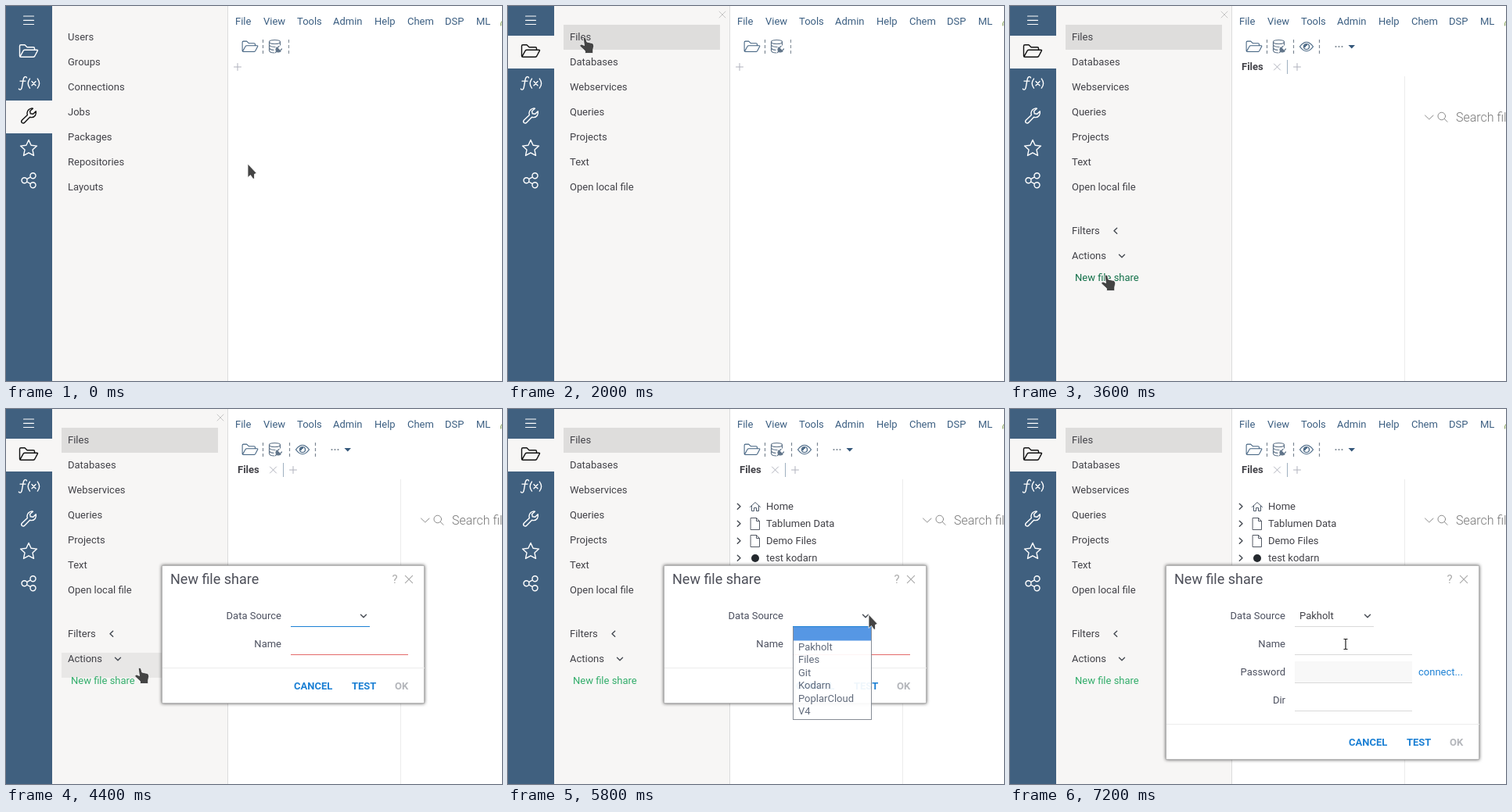
Write an HTML page that moves like this. It is 634 px wide and 480 px high and loops after 8200 ms.

```html
<!DOCTYPE html>
<html lang="en">
<head>
<meta charset="utf-8">
<title>New file share</title>
<style>
  html, body { margin: 0; width: 100%; height: 100%; overflow: hidden; background: #fff; }
  svg { display: block; width: 634px; height: 480px; }
  text { font: 13px Roboto, "Open Sans", sans-serif; fill: #424248; white-space: pre; }
  .line, .line * { fill: none; stroke-linecap: round; stroke-linejoin: round; }
  .side { stroke: #fff; stroke-width: 1.4; }
  .side.on { stroke: #111; }
  .menu text { fill: #3c5f82; }
  .tool { stroke: #40607f; stroke-width: 1.2; }
  .dash { stroke: #7d8994; stroke-dasharray: 4 3; stroke-linecap: butt; }
  .faint { stroke: #b0b2bd; }
  .dark { stroke: #454a52; stroke-width: 1.4; }
  .rule { stroke: #d9d9d9; }
  .label text { text-anchor: end; fill: #4d5160; }
  .button text { font-weight: 700; fill: #1c80d4; }
  .options text { fill: #566072; }
  #link { fill: #33ad6b; }
  #link.over { fill: #14714a; }
  #frame { fill: #fff; stroke: #b5b5b5; filter: drop-shadow(0 0 2px #000a); }
</style>
</head>
<body>
<svg viewBox="0 0 634 480">
  <defs>
    <path id="folder" d="M-11.5 6V-6.5Q-11.5-8-10-8H-5L-2-5H6Q7.5-5 7.5-3.5V-1.5M-11 7L-6.8-.5Q-6.2-1.5-5-1.5H10.5Q12-1.5 11.3-.3L7.8 6.3Q7 7.5 5.8 7.5H-10Q-11.5 7.5-11.5 6"/>
    <path id="func" d="M-2.5-7.2Q-3.3-9.2-5.3-8.2Q-6.6-7.3-7-4.5L-8.6 4.5Q-9.2 8-11 8Q-12 8-12.6 7M-11-3H-4M1.5-6Q-3.2 0 1.5 6M4-2.6L9 2.6M9-2.6L4 2.6M11.3-6Q16 0 11.3 6"/>
    <path id="wrench" d="M3-9.3Q-1.5-8-2-3.5Q-2-2-1.6-1L-8.5 5.5Q-10.2 7.5-8.5 9Q-6.7 10.3-5 8.5L1.5 1.8Q6 3 8.5-.5Q9.9-3 9.2-5.8L5.7-2.2L2.2-2.8L1.6-6L5.4-9.3Q4.2-9.7 3-9.3Z"/>
    <path id="star"/>
    <path id="share" d="M-9 0a3.5 3.5 0 1 0 7 0a3.5 3.5 0 1 0-7 0M2-6a3.5 3.5 0 1 0 7 0a3.5 3.5 0 1 0-7 0M2 6a3.5 3.5 0 1 0 7 0a3.5 3.5 0 1 0-7 0M-2.4-1.7L2.4-4.4M-2.4 1.7L2.4 4.4"/>
    <path id="down" d="M-3.5-1.7L0 1.7L3.5-1.7"/>
    <path id="right" d="M-1.7-3.7L2-.2L-1.7 3.3"/>
    <path id="cross" d="M-4-4L4 4M4-4L-4 4"/>
    <path id="plus" d="M-4.5 0H4.5M0-4.5V4.5"/>
    <path id="page" d="M-5.5-7.5H1.5L5.5-3.5V7.5H-5.5ZM1.5-7.5V-3.5H5.5"/>
  </defs>

  <rect width="59" height="480" fill="#40607f"/>
  <rect x="59" width="224" height="480" fill="#f7f6f5"/>
  <path d="M283.5 0V480" stroke="#dcdcdc"/>
  <rect id="cell" width="59" height="42" fill="#f7f6f5"/>
  <path class="line side" d="M22.5 13H35.5M22.5 18.3H35.5M22.5 23.5H35.5" style="stroke-width:1.2"/>
  <g id="side"></g>

  <rect id="chosen" x="71" y="24" width="200" height="32" fill="#dedddc"/>
  <rect id="hover" x="71" width="200" height="32" fill="#e8e7e6"/>
  <g id="admin"></g>
  <g id="data"></g>
  <g id="extra">
    <text x="79" y="292">Filters</text>
    <text x="79" y="324">Actions</text>
    <text id="link" x="83" y="352">New file share</text>
    <g class="line dark">
      <use href="#right" transform="translate(135 288) scale(-1 1)"/>
      <use href="#down" x="143" y="320"/>
    </g>
  </g>
  <use id="close" class="line" href="#cross" x="274" y="11" stroke="#c6c6c6"/>

  <g id="menu" class="menu"></g>
  <path class="line" d="M632.5 25Q631.5 21 635 18.5" stroke="#7d9a4a"/>
  <g class="line tool">
    <use href="#folder" transform="translate(312 52) scale(.86)"/>
    <path class="dash" d="M328.5 43V62"/>
    <g style="stroke:#61758a">
      <ellipse cx="343.5" cy="46" rx="7" ry="2.5"/>
      <path d="M336.5 46V57Q337 60 343 60M350.5 46V50M336.5 50Q338 52.5 344 52.5M336.5 54Q338 56.3 342 56.3"/>
      <path d="M344.5 59.5L347 57M349 51.5L347.5 53M352.5 55L351 56.5"/>
      <path d="M346 53L351 58Q348 60 346 58Q344 56 346 53Z" style="fill:#61758a"/>
    </g>
  </g>
  <g id="emptyTab" class="line">
    <path class="dash" d="M361.5 43V62"/>
    <use class="faint" href="#plus" x="296" y="78"/>
  </g>

  <g id="view">
    <g class="line tool">
      <path class="dash" d="M362.5 43V62M395.5 43V62"/>
      <path d="M370.5 52Q379 40.500 387.500 52Q379 63.500 370.500 52Z"/>
      <circle cx="379" cy="52" r="3.500"/>
      <path d="M377 52Q377 50 379 50" style="stroke-width:2"/>
    </g>
    <g fill="#7d8994">
      <circle cx="416.500" cy="52" r="1.100"/><circle cx="420.500" cy="52" r="1.100"/><circle cx="424.500" cy="52" r="1.100"/>
    </g>
    <path d="M432.500 50H441L436.800 54.500Z" fill="#34577a"/>
    <text x="296" y="82" style="font-weight:700">Files</text>
    <g class="line faint">
      <use href="#cross" x="341.500" y="78"/>
      <use href="#plus" x="367" y="78"/>
    </g>
    <path d="M354.500 69V87" stroke="#9fb0c0"/>
    <path d="M504.500 90V480" stroke="#ececec"/>
    <g class="line" stroke="#8c8c8c">
      <path d="M530.500 140L535.800 145L541 140"/>
      <circle cx="551.800" cy="141" r="4.800"/>
      <path d="M555.300 144.500L559 148.300"/>
    </g>
    <text x="570" y="148" style="font-size:16px;font-weight:300;fill:#777">Search files</text>
  </g>

  <g id="tree">
    <path class="line" d="M309.500 125.500L316 119.500L322.500 125.500M311.500 124V130.500H314.500V126.500H317.500V130.500H320.500V124" stroke="#4d5a6a"/>
    <g class="line" stroke="#555b66"><use href="#page" x="316" y="147"/><use href="#page" x="316" y="169"/></g>
    <circle cx="316" cy="191" r="5" fill="#24292e"/>
  </g>

  <g id="dialog">
    <rect id="frame" x="199.500" y="200.500"/>
    <text x="210" y="224" style="font-size:18px;fill:#4d4f59">New file share</text>
    <g id="corner">
      <text x="493.500" y="223" style="font-size:15px;fill:#aaa">?</text>
      <use class="line" href="#cross" transform="translate(515 218) scale(1.150)" stroke="#aaa"/>
    </g>
    <g class="label">
      <text x="352" y="269">Data Source</text>
      <text x="352" y="305">Name</text>
    </g>
    <use class="line dark" href="#down" x="457" y="265"/>
    <path id="sourceLine" d="M364 278.500H465"/>
    <path id="nameLine" d="M364 314.500H514"/>
    <g id="more">
      <text x="370" y="269" fill="#4d5160">Pakholt</text>
      <rect x="364" y="323" width="150" height="27" fill="#f8f8f8"/>
      <path class="rule" d="M364 350.500H514M364 386.500H514"/>
      <g class="label">
        <text x="352" y="341">Password</text>
        <text x="352" y="377">Dir</text>
      </g>
      <text x="522" y="341" style="fill:#1c80d4">connect...</text>
    </g>
    <path id="divider" stroke="#ececec"/>
    <g id="buttons" class="button">
      <text x="368" y="359">CANCEL</text>
      <text x="442" y="359">TEST</text>
      <text x="497" y="359" style="fill:#b4b6bb">OK</text>
    </g>
  </g>

  <g id="options" class="options">
    <rect x="364.500" y="278.500" width="100" height="119" fill="#fff" stroke="#7d848e"/>
    <rect id="pick" x="365" width="99" height="17.500" fill="#4a90e2"/>
    <path d="M364 278.500H465" stroke="#1c80d4"/>
  </g>

  <g id="cursor" stroke="#fff" stroke-width=".8" stroke-linejoin="round">
    <path id="arrow" d="M0 0V17.500L3.500 14.500L7 19.500L8.500 18.500V13.300L11.300 12Z" fill="#444"/>
    <path id="hand" d="M-1.800 1.500Q-.3-1 1.500 1.200L2.800 6L9.500 7.500Q12 8.500 11.700 11.500L10.700 16V20.500H.5V17.500L-6 11.500Q-7 9-4 9L-.5 10.500Z" transform="translate(-3 -3)" fill="#444"/>
    <path id="beam" d="M-2.500-6.500H-.8L0-6L.8-6.500H2.500M0-6V6M-2.500 6.500H-.8L0 6L.8 6.500H2.500" fill="none" style="stroke:#222;stroke-width:1.200"/>
  </g>
</svg>
<script>
  const LOOP = 8200, STEP = 100;
  const $ = id => document.getElementById(id);

  function add(parent, tag, attrs, content = "") {
    const el = document.createElementNS("http://www.w3.org/2000/svg", tag);
    for (const key in attrs) el.setAttribute(key, attrs[key]);
    el.textContent = content;
    return $(parent).appendChild(el);
  }
  const set = (id, attrs) => { for (const key in attrs) $(id).setAttribute(key, attrs[key]); };
  const show = (id, on) => { $(id).style.display = on ? "" : "none"; };
  const words = (parent, list, x, y, gap) =>
    list.map((word, i) => add(parent, "text", { x, y: Math.round(y + i * gap) }, word));

  words("admin", ["Users", "Groups", "Connections", "Jobs", "Packages", "Repositories", "Layouts"], 79, 44, 32);
  words("data", ["Files", "Databases", "Webservices", "Queries", "Projects", "Text", "Open local file"], 79, 44, 32);
  const treeRows = words("tree", ["Home", "Tablumen Data", "Demo Files", "test kodarn"], 330, 129, 22);
  treeRows.forEach((_, i) => add("tree", "use", { class: "line dark", href: "#right", x: 295, y: 125 + i * 22 }));
  const choices = words("options", ["Pakholt", "Files", "Git", "Kodarn", "PoplarCloud", "V4"], 371, 308.6, 16.5);

  const menu = { File: 293, View: 329, Tools: 372, Admin: 418, Help: 471, Chem: 513, DSP: 561, ML: 601 };
  for (const name in menu) add("menu", "text", { x: menu[name], y: 24 }, name);

  const starPoints = Array.from({ length: 10 }, (_, i) => {
    const a = i * Math.PI / 5, r = i % 2 ? 5.3 : 11;
    return (r * Math.sin(a)).toFixed(1) + " " + (0.6 - r * Math.cos(a)).toFixed(1);
  });
  set("star", { d: "M" + starPoints.join("L") + "Z" });

  const cellTop = i => 38 + i * 41.4;
  const icons = ["folder", "func", "wrench", "star", "share"].map(name =>
    add("side", "use", { href: "#" + name }));

  // Pointer hotspot: time, x, y
  const path = [
    [0, 309, 202], [100, 309, 202], [900, 72, 91], [1000, 44, 92], [1200, 30, 53],
    [1600, 30, 53], [1700, 62, 128], [1800, 88, 148], [2000, 101, 43], [2700, 101, 43],
    [3500, 124, 330], [3600, 126, 347], [4200, 126, 347], [5000, 431, 263], [5100, 447, 263],
    [5200, 469, 263], [5300, 469, 263], [5500, 461, 263], [5800, 461, 263],
    [6500, 429, 301], [LOOP, 429, 301]
  ];

  function pointer(t) {
    const i = path.findIndex(p => p[0] > t);
    const [t0, x0, y0] = path[i - 1], [t1, x1, y1] = path[i];
    let k = (t - t0) / (t1 - t0);
    if (t1 - t0 >= 600) k = k * k * (3 - 2 * k);
    return [Math.round(x0 + (x1 - x0) * k), Math.round(y0 + (y1 - y0) * k)];
  }

  function draw(t) {
    const [x, y] = pointer(t);
    const browsing = t >= 1400, opened = t >= 2700, asking = t >= 4000;
    const extra = t >= 2800, grown = t >= 6700;
    const inPane = x >= 59 && x < (asking ? 199 : 284);

    // Sidebar
    const active = browsing ? 0 : 2;
    const under = x < 59 ? Math.floor((y - 38) / 41.4) : -1;
    set("cell", { y: Math.round(cellTop(active)) });
    icons.forEach((icon, i) => {
      const scale = i === under && i !== active ? 1.2 : 1;
      icon.setAttribute("class", "line side" + (i === active ? " on" : ""));
      icon.setAttribute("transform", `translate(29 ${cellTop(i) + 19.7}) scale(${scale})`);
    });

    // Pane
    const row = Math.floor((y - 24) / 32);
    const overRow = inPane && x >= 71 && x < 271 && row >= 0 &&
      (row < 7 || extra && (row === 8 || row === 9));
    const overLink = extra && inPane && y >= 337 && y < 360;
    show("admin", !browsing);
    show("data", browsing);
    show("chosen", browsing);
    show("hover", overRow && !(browsing && row === 0));
    set("hover", { y: 24 + row * 32 });
    show("extra", extra);
    show("close", inPane);
    $("link").classList.toggle("over", overLink);

    // Workspace
    show("emptyTab", !opened);
    show("view", opened);
    show("tree", t >= 4500);

    // Dialog
    const dx = grown ? 65 : 0, dy = grown ? 72 : 0;
    show("dialog", asking);
    set("dialog", { opacity: t < 4100 ? 0.6 : 1 });
    set("frame", { width: 335 + dx, height: 176 + dy });
    set("corner", { transform: `translate(${dx} 0)` });
    set("buttons", { transform: `translate(${dx} ${dy})` });
    set("divider", { d: `M200 ${331.5 + dy}H${535 + dx}` });
    set("sourceLine", { stroke: grown ? "#d9d9d9" : "#1c80d4" });
    set("nameLine", { stroke: grown ? "#d9d9d9" : "#e46a6a" });
    show("more", grown);

    // Drop-down
    const first = y >= 297;
    show("options", t >= 5700 && !grown);
    set("options", { opacity: t < 5800 ? 0.6 : t < 5900 ? 0.93 : 1 });
    set("pick", { y: first ? 296.5 : 279 });
    choices[0].style.fill = first ? "#fff" : "";

    // Pointer
    const hand = overRow || overLink || x < 59;
    set("cursor", { transform: `translate(${x} ${y})` });
    show("beam", grown);
    show("hand", hand && !grown);
    show("arrow", !hand && !grown);
  }

  const start = performance.now();
  function tick() {
    const t = Math.max(0, performance.now() - start) % LOOP;
    draw(Math.floor(t / STEP) * STEP);
    requestAnimationFrame(tick);
  }
  tick();
</script>
</body>
</html>
```
